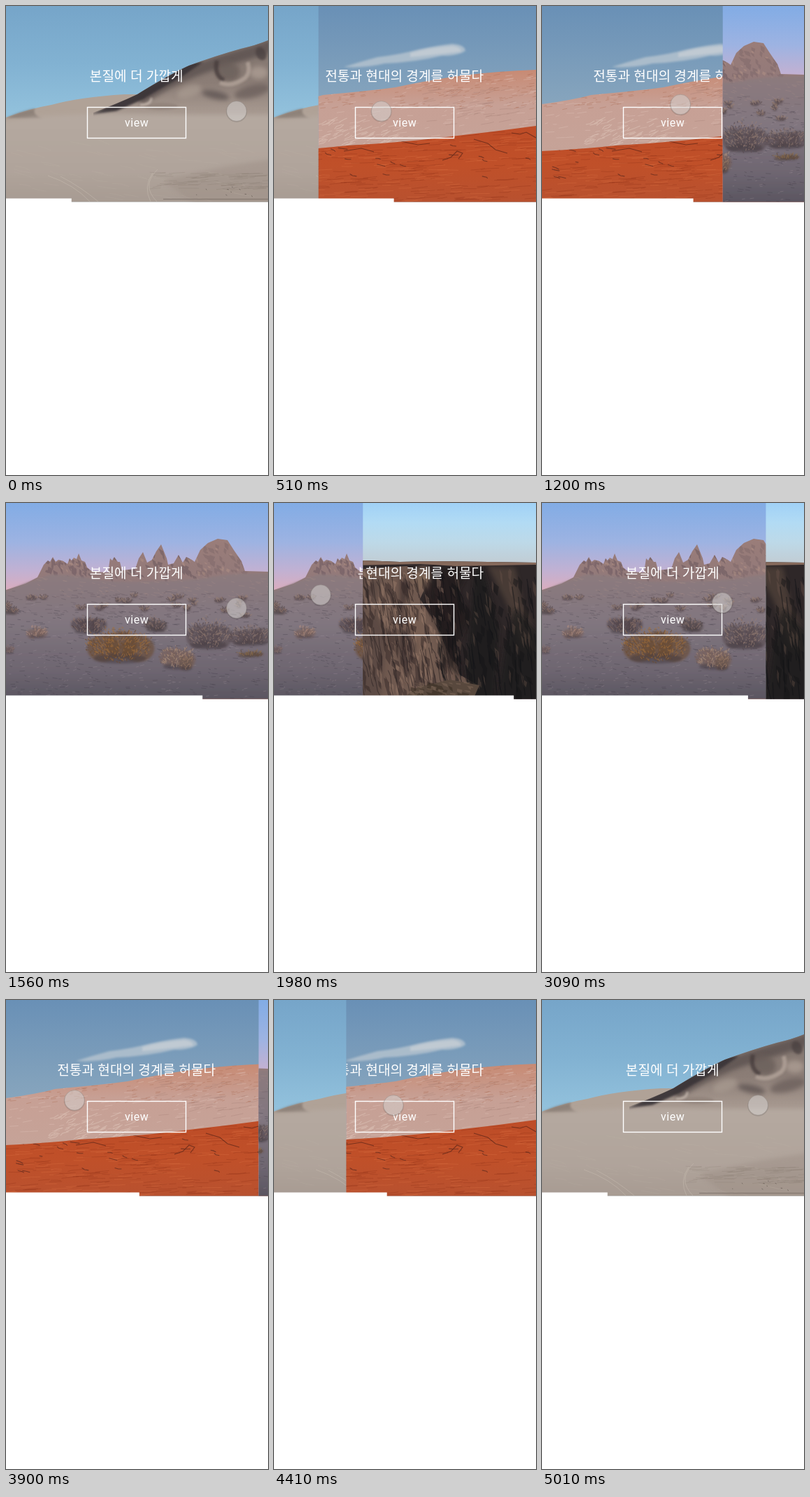
An HTML page that plays this animation: 375 by 669 pixels, repeating every 5.04 s.

```html
<!DOCTYPE html>
<html lang="ko">
<head>
<meta charset="utf-8">
<title>Swipe banner</title>
<style>
  html, body { margin: 0; width: 100%; height: 100%; overflow: hidden; background: #fff; }
  svg { display: block; width: 100vw; height: 100vh; }
  .title { font: 300 19.1px "Noto Sans CJK KR", "Noto Sans CJK", sans-serif; }
  .label { font: 400 16px Roboto, Inter, sans-serif; letter-spacing: .6px; }
</style>
</head>
<body>
<svg id="stage" viewBox="0 0 375 669" preserveAspectRatio="none"></svg>
<script>
const LOOP = 5040, STEP = 30, W = 375, H = 279.5;
const LEFT = 52, RIGHT = 330, SLOP = 15.5;

// ---------- drawing helpers ----------
let seed = 7;
const rnd = () => (seed = (seed * 16807) % 2147483647) / 2147483647;
const between = (a, b) => a + (b - a) * rnd();
const n1 = v => v.toFixed(1);

const shape = (d, fill, extra = '') => `<path d="${d}" fill="${fill}" ${extra}/>`;
const line = (d, color, width, extra = '') =>
  `<path d="${d}" fill="none" stroke="${color}" stroke-width="${width}" ${extra}/>`;
const soft = (d, fill, blur = 2, opacity = 1) =>
  shape(d, fill, `filter="url(#blur${blur})" opacity="${opacity}"`);
const softLine = (d, color, width, blur = 4, opacity = 1) =>
  line(d, color, width, `filter="url(#blur${blur})" opacity="${opacity}"`);
const blob = (cx, cy, rx, ry, fill, blur = 4, opacity = 1, turn = 0) =>
  `<ellipse rx="${rx}" ry="${ry}" transform="translate(${cx} ${cy}) rotate(${turn})" fill="${fill}" opacity="${opacity}" filter="url(#blur${blur})"/>`;
const gradient = (id, ...stops) =>
  `<linearGradient id="${id}" x1="0" y1="0" x2="0" y2="1">${stops.map(([o, c]) =>
    `<stop offset="${o}" stop-color="${c}"/>`).join('')}</linearGradient>`;
const sky = id => `<rect width="${W}" height="${H}" fill="url(#${id})"/>`;
const region = (id, d, fill, inner) =>
  `<clipPath id="${id}"><path d="${d}"/></clipPath>${shape(d, fill)}<g clip-path="url(#${id})">${inner}</g>`;

// Random short wobbling strokes inside a box.
function marks(count, [x0, y0, x1, y1], dx, dy, color, width, opacity, parts = 1) {
  let d = '';
  for (let i = 0; i < count; i++) {
    d += `M${n1(between(x0, x1))} ${n1(between(y0, y1))}`;
    for (let k = 0; k < parts; k++)
      d += `l${n1(dx * between(.3, 1) + between(-1, 1))} ${n1(dy * between(.3, 1) + between(-1, 1))}`;
  }
  return line(d, color, width, `opacity="${opacity}"`);
}

// Random rough facets, like chipped rock.
function facets(count, [x0, y0, x1, y1], w, h, color, opacity) {
  let d = '';
  for (let i = 0; i < count; i++) {
    const fw = w * between(.4, 1), fh = h * between(.3, 1);
    d += `M${n1(between(x0, x1))} ${n1(between(y0, y1))}l${n1(fw)} ${n1(fh * .3)} ${n1(fw * between(-.4, .4))} ${n1(fh * .7)} ${n1(-fw * .8)} ${n1(-fh * .4)}z`;
  }
  return shape(d, color, `opacity="${opacity}"`);
}

// A shrub: a few soft clumps with shade below, covered with twigs.
function bush(cx, cy, rx, ry, dark, light) {
  const twigs = (count, color, width, lift) => {
    let d = '';
    for (let i = 0; i < count; i++) {
      const a = between(0, Math.PI * 2), r = Math.sqrt(rnd()) * between(.8, 1.1);
      d += `M${n1(cx + rx * r * Math.cos(a))} ${n1(cy - lift + ry * r * Math.sin(a))}` +
           `l${n1(Math.cos(a) * 2 + between(-2, 2))} ${n1(between(-4, -1))}`;
    }
    return line(d, color, width, 'opacity=".6"');
  };
  const clumps = [-.5, .05, .55].map(k =>
    blob(n1(cx + k * rx), n1(cy + between(-.15, .2) * ry), rx * .5, ry * .8, dark, 2, .6)).join('');
  const n = Math.round(rx * ry / 5) + 8;
  return clumps + blob(cx, cy + ry * .7, rx * .8, ry * .3, '#3c343b', 2, .45) +
    twigs(n, dark, 1.5, 0) + twigs(n, light, 1.1, ry * .15);
}

// ---------- scenes ----------
const ridge = 'M125 152Q160 139 188 126Q232 99 262 85Q300 71 336 61Q358 56 375 49';
const dunes = () => sky('skyA') +
  shape('M0 159Q35 146 65 141Q105 130 170 126L230 126V175H0Z', '#b0a297') +
  soft('M0 160Q20 150 42 146Q36 154 52 161Z', '#786d66', 2, .6) +
  region('dune', ridge + 'L390 49V200H125Z', 'url(#slope)',
    softLine('M190 134Q235 106 268 93Q305 79 345 68L385 55', '#5d5351', 17, 4, .85) +
    soft('M120 156Q165 134 190 122L262 82L282 80L250 102L216 121L196 133L158 150Z', '#3b3437', 2, .95) +
    blob(318, 93, 17, 14, '#6a5e5a', 4, .8, 15) +
    softLine('M302 78Q297 98 312 106', '#453b3b', 6, 2, .75) +
    softLine('M306 109Q323 117 343 102Q350 94 346 80', '#b8a99f', 6, 2, .7) +
    blob(365, 68, 7, 10, '#4a4041', 2, .75, -25) +
    blob(362, 95, 13, 9, '#b0a197', 4, .7) +
    blob(300, 127, 20, 6, '#5f5453', 4, .8, 12) +
    blob(352, 122, 26, 9, '#685c59', 4, .7, -14) +
    blob(262, 122, 18, 8, '#a99b91', 4, .7, -20) +
    blob(222, 143, 24, 5, '#8d7f77', 2, .7) +
    softLine('M192 141Q208 141 208 131', '#cdbfb5', 3, 2, .8)) +
  soft('M-10 165Q80 152 180 154T390 155V300H-10Z', 'url(#sand)', 4) +
  soft('M225 249Q300 229 390 217V290H280Z', '#9d8f86', 4, .5) +
  marks(70, [205, 237, 370, 263], 16, -1, '#74685f', .6, .28, 2) +
  marks(55, [0, 190, 340, 275], 18, 4, '#c9bdb2', .7, .18, 2) +
  line('M217 233Q193 256 216 279M210 238Q196 258 207 279M60 242Q98 255 120 279M78 243Q107 258 132 279', '#cec2b7', 1, 'opacity=".4"') +
  line('M225 275.5H375', '#6d625b', 1.2, 'opacity=".65"') +
  marks(9, [270, 258, 360, 271], 3, 1, '#514842', .9, .6);

const redRock = () => sky('skyB') +
  soft('M100 87Q125 79 148 73Q182 69 207 62Q235 56 255 54Q273 55 274 64Q264 71 240 71Q203 80 158 82Q130 89 100 87Z', '#b0c0cd', 2, .9) +
  soft('M195 67Q225 59 256 57Q270 60 267 65Q228 70 195 73Z', '#c6ced5', 2, .8) +
  region('pale', 'M0 140Q45 134 70 127Q145 120 174 116Q220 106 270 99Q320 93 375 91V215H0Z', 'url(#pink)',
    marks(240, [0, 94, 375, 148], 9, -1.5, '#a9674f', .9, .4) +
    marks(180, [0, 100, 375, 200], 14, -2, '#dfc4b9', 1, .4) +
    marks(60, [60, 165, 175, 202], 9, -4, '#e2c9be', 1.1, .5, 2) +
    marks(50, [210, 115, 375, 170], 12, -2, '#966f66', .7, .35, 2)) +
  region('red', 'M0 207Q60 204 105 199Q190 194 246 187Q310 180 375 171V280H0Z', 'url(#rust)',
    marks(190, [-10, 177, 375, 279], 18, -1, '#8b3018', .9, .36, 2) +
    marks(130, [-10, 187, 375, 279], 16, -1, '#db7546', .9, .36, 2) +
    marks(24, [0, 195, 365, 245], 7, 2, '#54261c', 1.1, .65, 2) +
    line('M241 220l12-4 9-9 8 3-6 8M286 190l20 6 11 9 17 5M340 181l12 2 9-3 14 8M100 207l25-4 18 5M182 193l24 5 17-2', '#602719', 1.1, 'opacity=".75"'));

const desert = () => sky('skyC') +
  region('peaks', 'M0 124L28 115L45 106L54 88L60 82L63 84L67 77L71 84L75 81L82 83L88 87L91 79L94 82L97 78L101 80L104 72L108 82L113 84L116 92L124 98L146 99L149 79L152 82L155 77L160 84L163 84L166 96L185 94L190 79L196 70L202 85L209 81L215 69L222 59L230 79L232 88L240 86L247 74L253 85L258 77L266 81L270 84L278 67L289 57L303 51L317 53L326 67L337 83L342 97L375 98V190H0Z', 'url(#stone)',
    facets(45, [50, 76, 122, 106], 7, 13, '#5c4d55', .4) +
    facets(55, [146, 64, 266, 104], 7, 14, '#5a4b54', .4) +
    facets(40, [268, 56, 340, 100], 9, 12, '#6d595c', .3) +
    facets(60, [48, 62, 335, 102], 5, 9, '#bb9a8a', .38)) +
  soft('M-10 131Q30 112 65 102Q95 102 130 109T280 108Q330 98 390 101V300H-10Z', 'url(#dirt)', 2) +
  marks(120, [40, 104, 375, 135], 8, 2, '#a68c86', 1, .35) +
  marks(150, [0, 125, 375, 160], 10, 1, '#615660', 1.1, .35) +
  marks(340, [0, 150, 375, 279], 8, 1, '#443e48', 1, .36) +
  marks(270, [0, 140, 375, 279], 6, -1, '#a3959c', .8, .36) +
  Array.from({ length: 24 }, () =>
    bush(between(0, 375), between(132, 166), between(3, 8), between(2, 3.5), '#5f5052', '#9a8174')).join('') +
  bush(44, 185, 15, 8, '#7a625c', '#b29080') +
  bush(6, 154, 11, 5, '#594b4c', '#92766b') +
  bush(4, 210, 7, 5, '#6b595a', '#8c756f') +
  bush(118, 175, 25, 12, '#504346', '#8f756b') +
  bush(214, 174, 16, 10, '#524648', '#8e766d') +
  bush(290, 188, 32, 21, '#594b50', '#9a8076') +
  bush(350, 190, 30, 14, '#574a4e', '#917a72') +
  bush(163, 205, 47, 24, '#6b4b31', '#a6703a') +
  bush(245, 222, 25, 16, '#7a625a', '#b2947e') +
  bush(350, 216, 18, 4, '#614b3b', '#90704a') +
  bush(258, 228, 10, 11, '#6c5850', '#9c7d68');

const cliffs = () => sky('skyD') +
  region('cliff', 'M0 84L80 85L130 82L180 84L230 83L375 85V280H0Z', '#2e2728',
    shape('M0 93L128 94L190 90L222 108L209 137L228 166L247 208L266 245L292 260L284 280H0Z', '#6f594f') +
    blob(212, 108, 14, 18, '#806759', 4, .8, 15) +
    blob(208, 190, 16, 50, '#7b6356', 4, .6, -18) +
    soft('M122 120L152 105L145 152L161 190L151 290H122Z', '#54453f', 4, .7) +
    soft('M181 96L194 118L184 158L202 204L190 257L179 210Z', '#3b2f2e', 4, .7) +
    soft('M226 92L282 93L264 125L280 163L262 205L268 250L249 232L235 180L221 145Z', '#211c1f', 4, .8) +
    soft('M288 92L300 94L322 180L316 280H282L275 235Z', '#1d1a1d', 4, .8) +
    soft('M306 90L345 92L356 143L372 176V225L350 193L333 143Z', '#56463e', 4, .65) +
    soft('M345 150L385 190V290H318L330 210Z', '#1c1a1e', 4, .75) +
    facets(110, [120, 92, 245, 262], 9, 34, '#2d2323', .45) +
    facets(90, [122, 92, 240, 265], 7, 26, '#a08270', .38) +
    facets(60, [230, 92, 375, 262], 9, 38, '#131316', .45) +
    facets(50, [245, 90, 375, 255], 6, 26, '#6d574a', .35) +
    facets(70, [-5, 92, 122, 265], 8, 34, '#2d2323', .4) +
    facets(60, [-5, 92, 122, 265], 7, 26, '#a08270', .3) +
    marks(90, [120, 94, 250, 250], 4, 20, '#211a1c', 1.1, .5, 3) +
    marks(50, [225, 90, 375, 260], 3, 20, '#0f1014', 1.3, .5, 3) +
    shape('M182 280L207 262L232 257L251 252L274 256L294 260L285 280Z', '#58483d') +
    facets(30, [188, 256, 280, 276], 12, 10, '#33291f', .5) +
    facets(25, [190, 255, 280, 272], 9, 7, '#8b7160', .4) +
    shape('M0 82H375V88L260 90L210 87L120 89L0 90Z', '#85695b'));

const titles = ['본질에 더 가깝게', '전통과 현대의 경계를 허물다'];
const slides = [dunes, redRock, desert, cliffs].map((scene, i) => `
  <clipPath id="reveal${i}"><rect id="edge${i}" width="${W}" height="${H}"/></clipPath>
  <g clip-path="url(#reveal${i})">${scene()}
    <text class="title" x="186.7" y="106.5" fill="#fff" text-anchor="middle">${titles[i % 2]}</text>
  </g>`).join('');

document.getElementById('stage').innerHTML = `
  <defs>
    ${[2, 4].map(r => `<filter id="blur${r}" x="-60%" y="-60%" width="220%" height="220%"><feGaussianBlur stdDeviation="${r * .8}"/></filter>`).join('')}
    ${gradient('skyA', [0, '#76a5c9'], [.3, '#82b2d2'], [.55, '#92c1dc'], [1, '#92c1dc'])}
    ${gradient('slope', [0, '#83766f'], [.4, '#8b7d76'], [.65, '#a4968d'], [1, '#b3a69c'])}
    ${gradient('sand', [0, '#b5a9a0'], [.55, '#b0a49b'], [1, '#a3978e'])}
    ${gradient('skyB', [0, '#6990b6'], [.5, '#87a5bd'], [1, '#91aabd'])}
    ${gradient('pink', [0, '#c88a73'], [.4, '#c7a095'], [1, '#c5a398'])}
    ${gradient('rust', [0, '#bd4c27'], [.5, '#c05029'], [1, '#b8512f'])}
    ${gradient('skyC', [0, '#82ace5'], [.2, '#9db3e2'], [.34, '#c0b1d3'], [.44, '#d9adbf'], [1, '#d9adbf'])}
    ${gradient('stone', [0, '#9a7d79'], [1, '#87747a'])}
    ${gradient('dirt', [0, '#8c7a7d'], [.35, '#81767f'], [.7, '#6d6570'], [1, '#514d58'])}
    ${gradient('skyD', [0, '#a0d1f6'], [.1, '#b2dbf4'], [.2, '#bdd9e8'], [.3, '#c1cdd5'], [1, '#c1cdd5'])}
    <clipPath id="photo"><rect width="${W}" height="${H}"/></clipPath>
  </defs>
  <rect width="375" height="669" fill="#fff"/>
  <g clip-path="url(#photo)">${slides}</g>
  <rect x="116.5" y="144.5" width="141" height="44" fill="none" stroke="#fff" stroke-width="1.4"/>
  <text class="label" x="187.2" y="172" fill="#fff" text-anchor="middle">view</text>
  <rect id="bar" y="274.5" height="6" fill="#fff"/>
  <g id="cursor">
    <circle cy="1" r="15" fill="#000" opacity=".1"/>
    <circle r="14.3" fill="#eae6e4" fill-opacity=".5" stroke="#8e8883" stroke-opacity=".55" stroke-width=".8"/>
  </g>`;

// ---------- motion ----------
const accelerate = u => u * u;
const glide = u => .5 - .5 * Math.cos(Math.PI * u);
const settle = u => 1 - (1 - u) ** 2;
const clamp = v => Math.min(1, Math.max(0, v));

// Drag start, release, direction, snap duration.
const swipes = [
  [30, 448, 1, 250], [1021, 1281, 1, 250], [1727, 1987, 1, 250],
  [2779, 3039, -1, 168], [3530, 3790, -1, 168], [4240, 4500, -1, 168]
];

// Time, x, y, easing towards this point.
const path = [
  [0, RIGHT, 150], [30, RIGHT, 150, glide], [448, LEFT, 150, accelerate], [598, RIGHT, 150, glide],
  [1021, RIGHT, 150, glide], [1281, LEFT, 130, accelerate], [1431, RIGHT, 150, glide],
  [1727, RIGHT, 150, glide], [1987, LEFT, 130, accelerate],
  [2779, LEFT, 130, glide], [3039, RIGHT, 142, accelerate], [3189, LEFT, 143, glide],
  [3530, LEFT, 143, glide], [3790, RIGHT, 143, accelerate], [3940, LEFT, 143, glide],
  [4240, LEFT, 150, glide], [4500, RIGHT, 150, accelerate], [4650, LEFT, 150, glide],
  [4870, LEFT, 150, glide], [LOOP, RIGHT, 150, glide]
];

function cursorAt(t) {
  const i = path.findIndex(p => p[0] > t);
  const [t0, x0, y0] = path[i - 1], [t1, x1, y1, ease] = path[i];
  const u = ease((t - t0) / (t1 - t0));
  return [x0 + (x1 - x0) * u, y0 + (y1 - y0) * u];
}

function swipeProgress(t, [start, release, , snap]) {
  if (t <= start) return 0;
  const full = RIGHT - LEFT;
  const pulled = full * accelerate(clamp((t - start) / (release - start)));
  const dragged = Math.max(0, pulled - SLOP) / W;
  return dragged + (1 - dragged) * settle(clamp((t - release) / snap));
}

const el = id => document.getElementById(id);
const edges = [0, 1, 2, 3].map(i => el('edge' + i));
const bar = el('bar'), cursor = el('cursor');

function draw(t) {
  const page = swipes.reduce((sum, s) => sum + s[2] * swipeProgress(t, s), 0);
  edges.forEach((edge, i) => edge.setAttribute('x', W * clamp(i - page)));
  bar.setAttribute('width', W * (page + 1) / 4);
  cursor.setAttribute('transform', `translate(${cursorAt(t).map(n1)})`);
}

const begin = performance.now();
function tick() {
  const t = (performance.now() - begin) % LOOP;
  draw(Math.floor(t / STEP) * STEP);
  requestAnimationFrame(tick);
}
tick();
</script>
</body>
</html>
```
